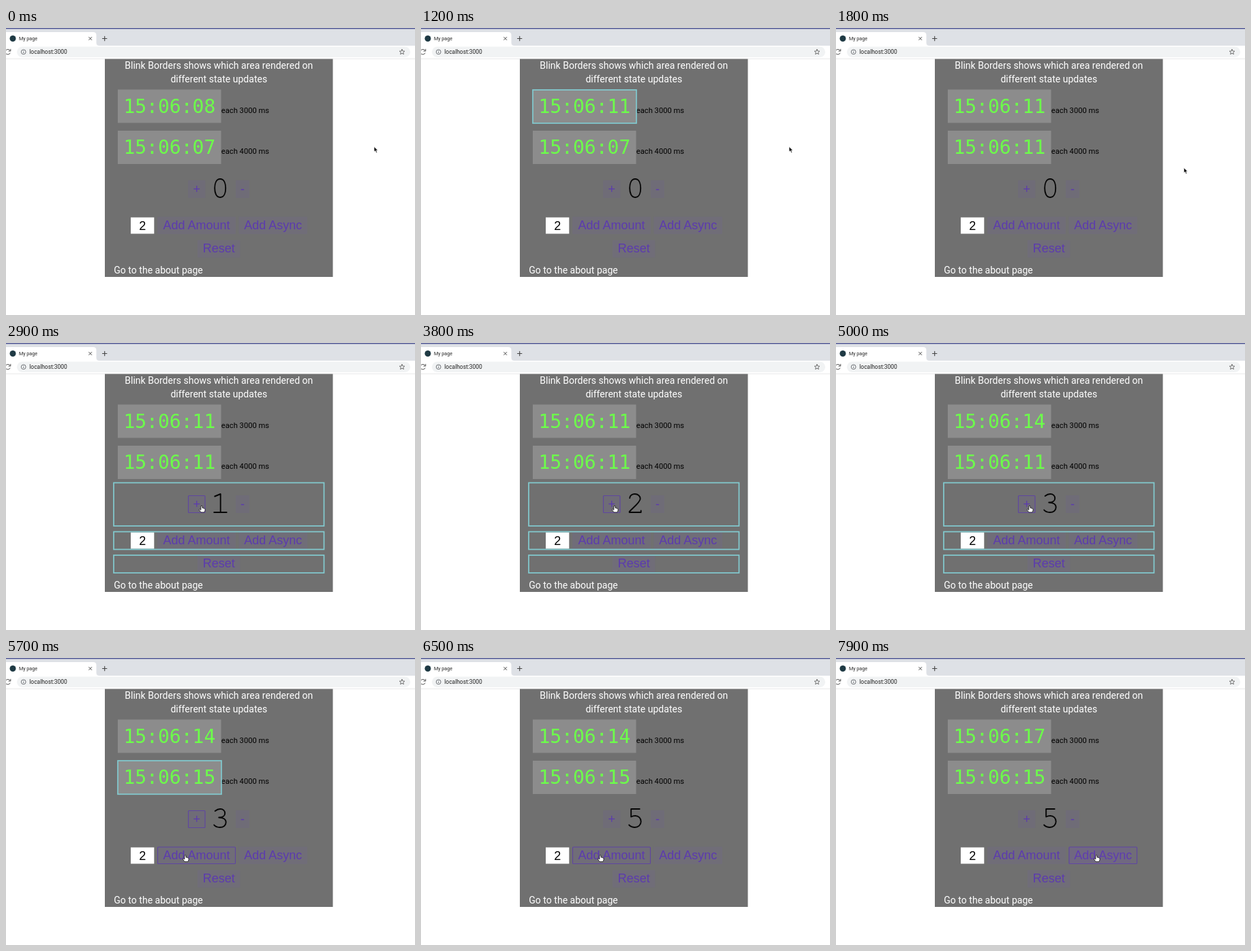
Write an HTML page that moves like this. It is 600 px wide and 422 px high and loops after 8000 ms.

```html
<!DOCTYPE html>
<html lang="en">
<head>
<meta charset="utf-8">
<title>My page</title>
<style>
  html, body { margin: 0; width: 100%; height: 100%; overflow: hidden; background: #fff; }
  svg { display: block; width: 600px; height: 422px; }
  text { white-space: pre; }
  .ui { font-family: Roboto, sans-serif; }
  .title { font-size: 14.06px; fill: #fff; }
  .note { font-size: 11.2px; fill: #000; }
  .clock { font: 28px "DejaVu Sans Mono", monospace; fill: #6cff4a; }
  .label { font: 18px "Liberation Sans", Arial, sans-serif; text-anchor: middle; fill: #5c3bae; }
  .line { fill: none; stroke-linecap: round; stroke-linejoin: round; }
  .button { fill: rgba(112, 76, 182, .1); }
  .ring { fill: none; stroke: #5f46a0; stroke-width: 1.1; }
  .blink { fill: none; stroke: #82cbd0; stroke-width: 1.7; }
</style>
</head>
<body>
<svg id="stage" viewBox="0 0 600 422" xmlns="http://www.w3.org/2000/svg">
  <rect width="600" height="422" fill="#fff"/>
  <rect width="600" height="26" fill="#dee1e6"/>
  <rect width="600" height="1.4" fill="#4c5392"/>
  <path d="M0 6H128Q132.500 6 132.500 10.500V21.500Q132.500 26 137 26H0Z" fill="#fff"/>
  <circle cx="10" cy="15.500" r="4.500" fill="#1f3a44"/>
  <text class="ui" x="19" y="18.200" font-size="7.1" fill="#222">My page</text>
  <path class="line" d="M121.700 13.500l4 4m0-4l-4 4" stroke="#444" stroke-width="1"/>
  <path class="line" d="M141.500 15.500h6.400m-3.200-3.200v6.400" stroke="#444" stroke-width="1.1"/>
  <rect x="16" y="27.500" width="577" height="15.500" rx="7.750" fill="#f1f3f4"/>
  <path class="line" d="M0 32.600A3.600 3.600 0 0 1 6 33M6 37A3.600 3.600 0 0 1 0 37.800M6.800 31.200V34H4" stroke="#555" stroke-width="1"/>
  <circle cx="25.700" cy="35.200" r="3.400" fill="none" stroke="#5f6368" stroke-width=".9"/>
  <path d="M25.700 34.800v2.200M25.700 33.100v.8" stroke="#5f6368" stroke-width=".9"/>
  <text class="ui" x="34.300" y="38.200" font-size="8.45" fill="#222">localhost:3000</text>
  <path class="line" d="M581 31.400l1.100 2.500 2.700.2-2.100 1.800.7 2.700-2.400-1.400-2.400 1.400.7-2.700-2.100-1.800 2.700-.2z" stroke="#555" stroke-width=".8"/>
  <path d="M0 45.300H600" stroke="#e2e3e5" stroke-width=".8"/>

  <rect x="145" y="45.500" width="334.500" height="320.500" fill="#707070"/>
  <g class="ui title">
    <text x="312.300" y="60.300" text-anchor="middle">Blink Borders shows which area rendered on</text>
    <text x="312.300" y="79.800" text-anchor="middle">different state updates</text>
    <text x="158.300" y="361">Go to the about page</text>
  </g>
  <rect x="164" y="90.500" width="151.500" height="49" fill="#8c8c8c"/>
  <rect x="164" y="151" width="151.500" height="49" fill="#8c8c8c"/>
  <text class="clock" id="clockA" x="172.400" y="124.800"></text>
  <text class="clock" id="clockB" x="172.400" y="185.200"></text>
  <text class="ui note" x="315.800" y="124.600">each 3000 ms</text>
  <text class="ui note" x="315.800" y="185">each 4000 ms</text>
  <path class="line" id="count" role="img" transform="translate(314.200 249)" stroke="#060606" stroke-width="1.9"/>
  <rect x="183" y="278.500" width="34.300" height="24" fill="#fff"/>
  <text class="label" x="200.300" y="297" style="fill:#000">2</text>
  <g id="buttons"></g>
  <rect id="fill" x="341.500" y="277.500" height="25.500" fill="rgba(112,76,182,.15)"/>
  <g id="blinks"></g>
  <path id="arrow" d="M0 0V7.600L1.800 6 3.100 8.900 4.500 8.300 3.200 5.500H5.500Z" fill="#000" stroke="#fff" stroke-width=".7"/>
  <path id="hand" d="M-1.100.4Q0-.8 1 .4V3.200Q1.800 2.700 2.400 3.500 3.300 3 3.800 3.900 5 3.600 5 4.900V6.800L4 9.400H-1L-3.600 5.900Q-3.700 4.500-2.300 5L-1.100 6Z" fill="#fff" stroke="#111" stroke-width=".8" stroke-linejoin="round"/>
</svg>
<script>
const LOOP = 8000, STEP = 100, BLINK = 400;
const $ = id => document.getElementById(id);

function add(parent, tag, attrs, text = "") {
  const el = document.createElementNS("http://www.w3.org/2000/svg", tag);
  for (const key in attrs) el.setAttribute(key, attrs[key]);
  el.textContent = text;
  return parent.appendChild(el);
}
const box = (x, y, width, height) => ({ x, y, width, height });
const show = (el, on) => el.setAttribute("visibility", on ? "visible" : "hidden");

// label, box, outlined from, outlined until
const rings = [
  ["+", box(267, 224, 25.5, 26), 2600, 5900],
  ["-", box(337, 224, 20, 26), 0, 0],
  ["Add Amount", box(222, 277.5, 115, 25.5), 5500, 7000],
  ["Add Async", box(341.5, 277.5, 100.5, 25.5), 6800, LOOP],
  ["Reset", box(281, 312, 62.5, 25.5), 0, 0]
].map(([label, b, from, to]) => {
  add($("buttons"), "rect", { ...b, class: "button", rx: 1 });
  add($("buttons"), "text", { class: "label", x: b.x + b.width / 2, y: b.y + (b.height < 26 ? 18.2 : 18.6) }, label);
  const el = add($("buttons"), "rect", { class: "ring", rx: 1, ...box(b.x + .5, b.y + .5, b.width - 1, b.height - 1) });
  return { el, from, to };
});

const ticksA = [[0, "08"], [1200, "11"], [4200, "14"], [7200, "17"]];
const ticksB = [[0, "07"], [1400, "11"], [5400, "15"]];
const counts = [[0, 0], [2800, 1], [3700, 2], [4700, 3], [5900, 5]];

const blinks = [
  [box(164, 91, 152, 49), ticksA],
  [box(164, 151, 152, 49.3), ticksB],
  [box(158, 205.5, 308.5, 63.5), counts],
  [box(158, 277.5, 308.5, 26), counts],
  [box(158, 312, 308.5, 26), counts]
].map(([b, steps]) => ({ el: add($("blinks"), "rect", { class: "blink", ...b }), steps }));

const digits = {
  0: "M0-27C-6-27-8-20-8-13.500S-6 0 0 0 8-7 8-13.500 6-27 0-27Z",
  1: "M-8-23.500L.5-27V0M-9 0H9.500",
  2: "M-8-21C-8-25-4-27-.5-27C4-27 7.500-24 7.500-20C7.500-15-3-7-8.500-1V0H8.500V-2.500",
  3: "M-7.500-24C-5-26-3-27 0-27C4.500-27 7-24 7-20.500C7-17 4-14.500-2-14.500C4-14.500 8.500-12 8.500-7.500C8.500-3 5 0-.5 0C-4 0-7-1-9-3.500",
  5: "M6.500-27H-6V-15.500C-4-16.500-2-17 0-17C5-17 8.500-13.500 8.500-8.500C8.500-3.500 4.500 0-.5 0C-4 0-7-1.500-9-3.500"
};

// time, x, y
const route = [
  [0, 540, 174.500], [1400, 540, 174.500], [1800, 510.300, 205.500], [2600, 287, 239.500],
  [3100, 287, 239.500], [3600, 284, 239.500], [5000, 284, 239.500], [5600, 263, 290],
  [6500, 263, 290], [7000, 382, 290], [LOOP, 382, 290]
];

const current = (steps, t) => steps.filter(s => s[0] <= t).pop();

function pointer(t) {
  const i = route.findIndex(p => p[0] > t);
  const [t0, x0, y0] = route[i - 1], [t1, x1, y1] = route[i];
  const u = (t - t0) / (t1 - t0), k = u * u * (3 - 2 * u);
  return [x0 + (x1 - x0) * k, y0 + (y1 - y0) * k];
}

function draw(t) {
  $("clockA").textContent = "15:06:" + current(ticksA, t)[1];
  $("clockB").textContent = "15:06:" + current(ticksB, t)[1];
  const count = current(counts, t)[1];
  $("count").setAttribute("d", digits[count]);
  $("count").setAttribute("aria-label", count);
  rings.forEach(r => show(r.el, t >= r.from && t < r.to));
  blinks.forEach(b => {
    const start = current(b.steps, t)[0];
    show(b.el, start > 0 && t - start < BLINK);
  });
  $("fill").setAttribute("width", Math.max(0, (t - 7000) / 1000) * 100.5);
  const at = `translate(${pointer(t)})`;
  $("arrow").setAttribute("transform", at);
  $("hand").setAttribute("transform", at);
  show($("arrow"), t < 2600);
  show($("hand"), t >= 2600);
}

const begin = performance.now();
function frame() {
  const t = (performance.now() - begin) % LOOP;
  draw(Math.floor(t / STEP) * STEP);
  requestAnimationFrame(frame);
}
frame();
</script>
</body>
</html>
```
